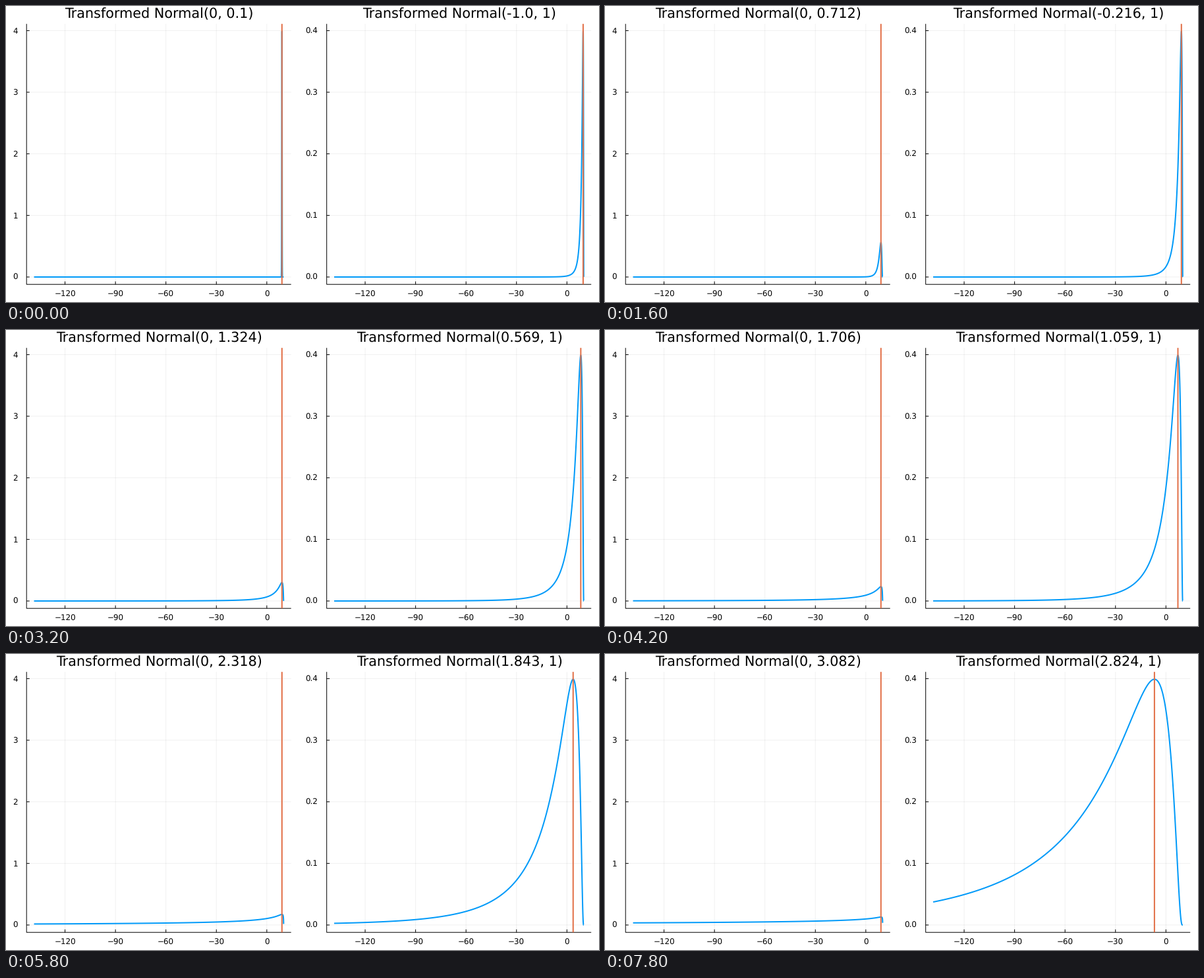
A matplotlib script that plays this animation: 900 px wide and 450 px high, repeating every 8 s.

```python
import numpy as np
import matplotlib.pyplot as plt
from matplotlib.animation import FuncAnimation

W, H, DPI = 900, 450, 100
FRAMES, INTERVAL = 40, 200
STEPS = 51                      # parameter steps in the full sweep
BLUE, ORANGE = "#009af9", "#e26f46"
TITLE_SIZE, TICK_SIZE = 20.75, 11.85

plt.rcParams.update({
    "font.family": "DejaVu Sans",
    "text.hinting": "none",
    "path.simplify": False,
})


def pt(px):
    return px * 72 / DPI


def normal_pdf(y, mean, sd):
    return np.exp(-0.5 * ((y - mean) / sd) ** 2) / (sd * np.sqrt(2 * np.pi))


def transform(y):
    return 10 - np.exp(y)


def widen(lo, hi, frac=0.03):
    pad = frac * (hi - lo)
    return lo - pad, hi + pad


y = np.linspace(-5, 5, 1001)
x = transform(y)

# One axes covers the stage, measured in pixels from the top left.
fig = plt.figure(figsize=(W / DPI, H / DPI), dpi=DPI, facecolor="white")
stage = fig.add_axes([0, 0, 1, 1])
stage.set_xlim(0, W)
stage.set_ylim(H, 0)
stage.axis("off")


def stroke(xs, ys, color="black", width=1, **kw):
    line, = stage.plot(xs, ys, color=color, lw=pt(width), snap=False,
                       solid_capstyle="butt", **kw)
    return line


def label(px, py, text, size, **kw):
    return stage.text(px, py, text, fontsize=pt(size), color="black",
                      va="baseline", **kw)


class Panel:
    TOP, BOTTOM, WIDTH = 27.2, 423.2, 401.5
    TICK = 4.5

    def __init__(self, left, title_x, peak, yticks, fmt):
        self.left = left
        self.xlim = widen(x.min(), x.max())
        self.ylim = widen(0, peak)
        xticks = np.arange(-120, 1, 30)
        right = left + self.WIDTH
        cols, rows = self.px(xticks), self.py(yticks)

        for c in cols:
            stroke([c, c], [self.TOP, self.BOTTOM], alpha=0.06)
        for r in rows:
            stroke([left, right], [r, r], alpha=0.06)

        stroke([left, left, right], [self.TOP, self.BOTTOM, self.BOTTOM],
               solid_joinstyle="miter")
        for c, t in zip(cols, xticks):
            stroke([c, c], [self.BOTTOM, self.BOTTOM - self.TICK])
            label(c, 441.7, str(t).replace("-", "\u2212"), TICK_SIZE,
                  ha="center")
        for r, t in zip(rows, yticks):
            stroke([left, left + self.TICK], [r, r])
            label(left - 13.2, r + 4.3, format(t, fmt), TICK_SIZE, ha="right")

        self.title = label(title_x, 17.8, "", TITLE_SIZE, ha="center")
        self.curve = stroke([], [], BLUE, 2)
        self.marker = stroke([], [], ORANGE, 2)

    def px(self, v):
        lo, hi = self.xlim
        return self.left + (v - lo) / (hi - lo) * self.WIDTH

    def py(self, v):
        lo, hi = self.ylim
        return self.BOTTOM - (v - lo) / (hi - lo) * (self.BOTTOM - self.TOP)

    def show(self, mean, sd):
        self.title.set_text(
            f"Transformed Normal({round(mean, 3)}, {round(sd, 3)})")
        self.curve.set_data(self.px(x), self.py(normal_pdf(y, mean, sd)))
        self.marker.set_data([self.px(transform(mean))] * 2,
                             [self.TOP, self.BOTTOM])

    def artists(self):
        return [self.title, self.curve, self.marker]


spread = Panel(31.2, 232.6, normal_pdf(0, 0, 0.1), np.arange(5), "d")
shift = Panel(486.7, 688.2, normal_pdf(0, 0, 1), np.arange(5) / 10, ".1f")


def update(i):
    k = i / STEPS
    spread.show(0, 0.1 + 3.9 * k)
    shift.show(-1 + 5 * k, 1)
    return spread.artists() + shift.artists()


anim = FuncAnimation(fig, update, frames=FRAMES, init_func=lambda: update(0),
                     interval=INTERVAL, repeat=True, repeat_delay=0, blit=False)

plt.show()
```
